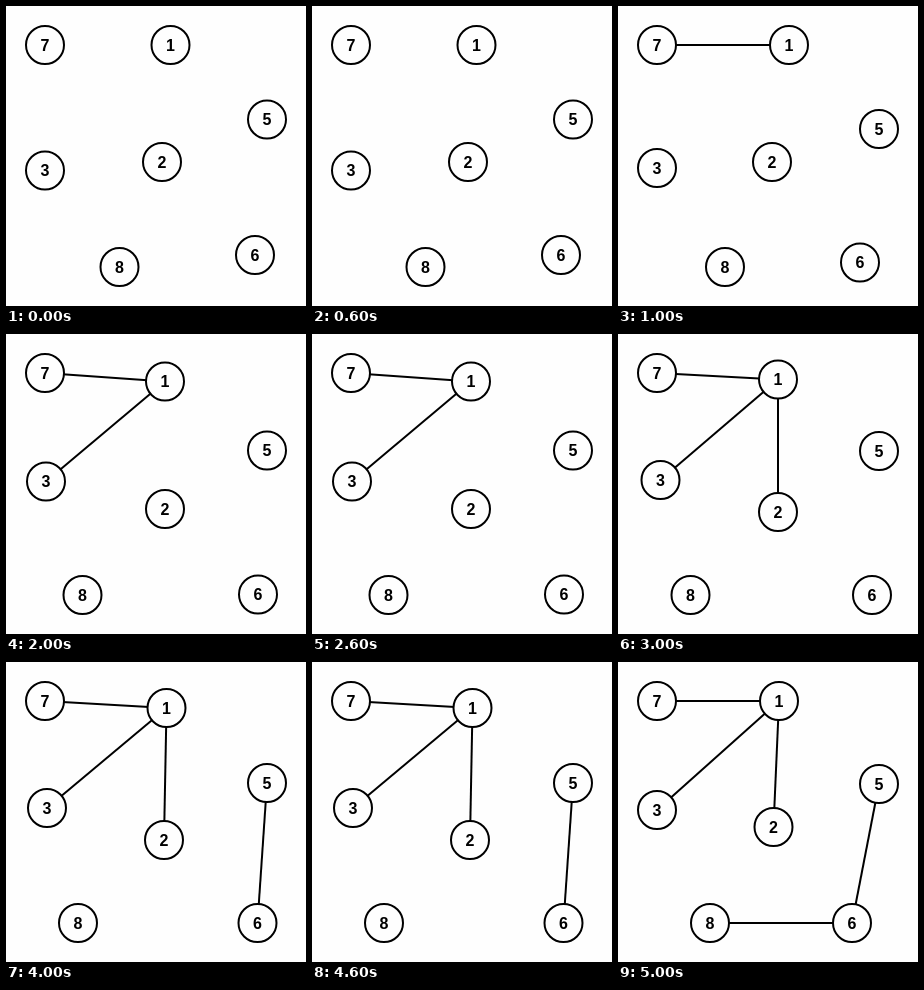
Write an HTML page with a canvas that moves like this. It is 300 px wide and 300 px high and loops after 6000 ms.

```html
<!DOCTYPE html>
<html lang="en">
<head>
<meta charset="utf-8">
<title>Graph growing edge by edge</title>
<style>
  html, body { margin: 0; width: 100%; height: 100%; overflow: hidden; background: #fefefe; }
  canvas { display: block; }
</style>
</head>
<body>
<canvas id="stage" width="300" height="300"></canvas>
<script>
const ctx = document.getElementById('stage').getContext('2d');
const PAPER = '#fefefe';
const INK = '#000';
const RADIUS = 19;
const STEP_MS = 1000;

// Node order for every layout; each step reveals one more edge.
const labels = [7, 1, 5, 3, 2, 8, 6];
const edges = [[7, 1], [1, 3], [1, 2], [5, 6], [6, 8]];
const layouts = [
  [[39, 39], [164.5, 39], [261, 113.5], [39, 164.5], [156, 156], [113.5, 261], [249, 249]],
  [[39, 39], [171, 39], [261, 123], [39, 162], [154, 156], [107, 261], [242, 256.5]],
  [[39, 39], [159, 47.5], [261, 116.5], [40, 147.5], [159, 175], [76.5, 261], [252, 260.5]],
  [[39, 39], [160, 45.5], [261, 117], [42.5, 146], [160, 178], [72.5, 261], [254, 261]],
  [[39, 39], [160.5, 46], [261, 121], [41, 146], [158, 178], [72, 261], [251.5, 261]],
  [[39, 39], [161, 39], [261, 122], [39, 148], [155.5, 165], [92, 261], [234, 261]]
];

function drawEdge(from, to) {
  ctx.beginPath();
  ctx.moveTo(...from);
  ctx.lineTo(...to);
  ctx.stroke();
}

function drawNode([x, y], label) {
  ctx.beginPath();
  ctx.arc(x, y, RADIUS, 0, Math.PI * 2);
  ctx.fillStyle = PAPER;
  ctx.fill();
  ctx.stroke();
  ctx.fillStyle = INK;
  ctx.fillText(label, x, y + 5.5);
}

function draw(step) {
  const layout = layouts[step];
  const place = label => layout[labels.indexOf(label)];
  ctx.fillStyle = PAPER;
  ctx.fillRect(0, 0, 300, 300);
  ctx.strokeStyle = INK;
  ctx.lineWidth = 2;
  ctx.font = 'bold 16px "Liberation Sans", Arial, sans-serif';
  ctx.textAlign = 'center';
  for (const [a, b] of edges.slice(0, step)) drawEdge(place(a), place(b));
  for (const label of labels) drawNode(place(label), label);
}

const start = performance.now();
function tick() {
  const elapsed = performance.now() - start;
  draw(Math.floor(elapsed / STEP_MS) % layouts.length);
  requestAnimationFrame(tick);
}
tick();
</script>
</body>
</html>
```
